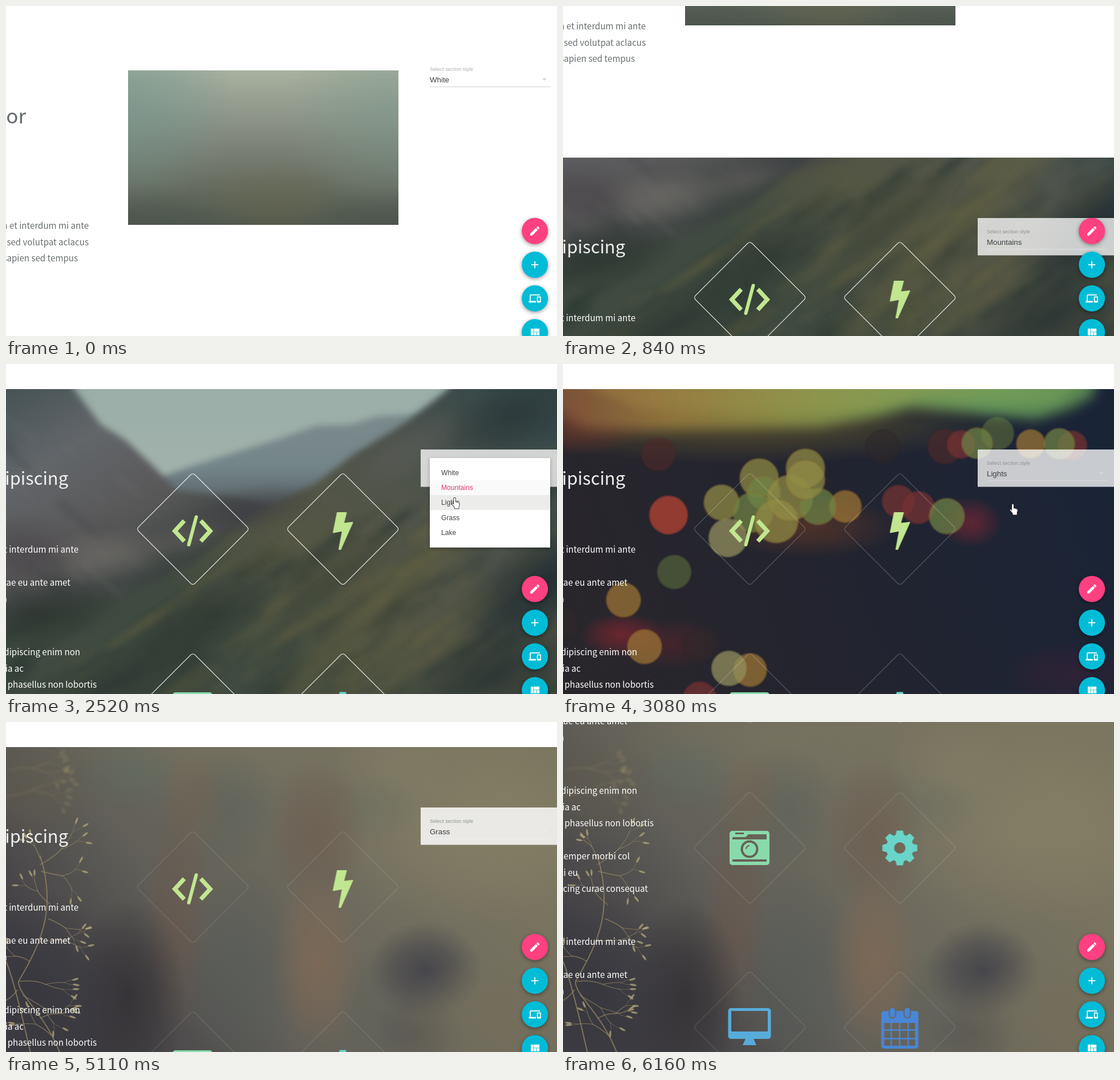
An HTML page with a canvas for the animation above (6230 ms loop, 966x579 px).

```html
<!DOCTYPE html>
<html lang="en">
<head>
<meta charset="utf-8">
<title>Section styles</title>
<style>
html, body { margin: 0; width: 100%; height: 100%; overflow: hidden; background: #fff; }
canvas { display: block; }
</style>
</head>
<body>
<canvas id="stage" width="966" height="579"></canvas>
<script>
const W = 966, H = 579, LOOP = 6230, STEP = 70;
const ctx = document.getElementById('stage').getContext('2d');
const HUMANIST = '"Noto Sans CJK JP", "Noto Sans CJK SC", "Noto Sans CJK", "Open Sans", sans-serif';
const UI = '"Liberation Sans", Arial, sans-serif';

const clamp = v => Math.max(0, Math.min(1, v));
const ramp = (t, a, b) => clamp((t - a) / (b - a));
const smooth = p => p * p * (3 - 2 * p);
const easeOut = p => 1 - (1 - p) ** 3;
const lerp = (a, b, p) => a + (b - a) * p;

function random(seed) {
  return () => {
    seed = (seed * 1664525 + 1013904223) >>> 0;
    return seed / 4294967296;
  };
}

function layer(w, h, draw) {
  const c = document.createElement('canvas');
  c.width = w;
  c.height = h;
  draw(c.getContext('2d'));
  return c;
}

function poly(g, pts, fill) {
  g.beginPath();
  for (let i = 0; i < pts.length; i += 2) g.lineTo(pts[i], pts[i + 1]);
  g.closePath();
  g.fillStyle = fill;
  g.fill();
}

function grad(g, x0, y0, x1, y1, ...cols) {
  const f = g.createLinearGradient(x0, y0, x1, y1);
  cols.forEach((c, i) => f.addColorStop(i / (cols.length - 1), c));
  return f;
}

function blob(g, x, y, rx, ry, rgb, a = 1, turn = 0) {
  g.save();
  g.translate(x, y);
  g.rotate(turn);
  g.scale(rx, ry);
  const f = g.createRadialGradient(0, 0, 0, 0, 0, 1);
  f.addColorStop(0, `rgba(${rgb},${a})`);
  f.addColorStop(.5, `rgba(${rgb},${a * .6})`);
  f.addColorStop(1, `rgba(${rgb},0)`);
  g.fillStyle = f;
  g.fillRect(-1, -1, 2, 2);
  g.restore();
}

function circle(g, x, y, r, fill) {
  g.beginPath();
  g.arc(x, y, r, 0, 7);
  g.fillStyle = fill;
  g.fill();
}

// ---- backdrops, fixed to the viewport ----
const mountains = layer(W, H, g => {
  const rnd = random(11);
  // short blurred strokes along a slope, light or dark
  function streaks(count, slope, inside, light, dark) {
    for (let i = 0; i < count; i++) {
      const x = rnd() * 1060 - 40, y = 60 + rnd() * 560, len = 20 + rnd() * 60;
      const tone = Math.sin((y - x * slope) / 30) + (rnd() - .5) * 1.6;
      if (!inside(x, y)) continue;
      g.strokeStyle = tone > 0 ? light : dark;
      g.lineWidth = 5 + rnd() * 11;
      g.beginPath();
      g.moveTo(x - len / 2, y - len * slope / 2);
      g.lineTo(x + len / 2, y + len * slope / 2);
      g.stroke();
    }
  }
  g.lineCap = 'round';
  g.fillStyle = grad(g, 0, 0, 0, 220, '#98aca6', '#a3b3ac');
  g.fillRect(0, 0, W, H);
  g.filter = 'blur(6px)';
  poly(g, [250, 215, 285, 193, 340, 174, 400, 156, 470, 134, 545, 108, 605, 106, 650, 92, 715, 88, 800, 30, 980, 30, 980, 600, 250, 600],
    grad(g, 0, 90, 0, 270, '#7a898b', '#74858a', '#505659'));
  poly(g, [-20, -20, 95, -20, 121, 46, 165, 105, 209, 133, 261, 182, 300, 222, 400, 234, 480, 252, 420, 600, -20, 600],
    grad(g, 0, 40, 220, 420, '#455254', '#62666a', '#595859', '#3b443f'));
  streaks(150, .85, (x, y) => x < 330 && y > x * .7 + 50 && y < 400, 'rgba(118,116,116,.16)', 'rgba(52,56,62,.18)');
  poly(g, [830, -20, 772, 48, 735, 78, 690, 110, 610, 158, 540, 212, 470, 243, 400, 290, 330, 350, 200, 410, -20, 470, -20, 600, 980, 600, 980, -20],
    grad(g, 880, 60, 480, 560, '#37484a', '#4f544b', '#545644', '#3f4a40'));
  blob(g, 175, 335, 120, 48, '122,117,112', .6, -.1);
  blob(g, 325, 300, 90, 30, '104,98,97', .5, -.3);
  blob(g, 20, 330, 110, 70, '72,66,70', .6);
  blob(g, 50, 440, 160, 60, '40,50,45', .8, -.2);
  blob(g, 420, 258, 130, 42, '62,62,68', .7, -.2);
  blob(g, 710, 150, 120, 45, '92,94,90', .6, -.6);
  blob(g, 890, 90, 130, 65, '43,55,56', .8, -.4);
  streaks(560, -.7, (x, y) => y > 500 - x * .36, 'rgba(104,100,64,.22)', 'rgba(43,55,51,.24)');
  blob(g, 690, 385, 230, 42, '102,98,64', .5, -.62);
  blob(g, 560, 520, 150, 38, '104,100,66', .5, -.6);
  blob(g, 850, 240, 200, 38, '103,101,71', .6, -.6);
  blob(g, 580, 375, 150, 32, '48,58,50', .5, -.65);
  blob(g, 340, 440, 150, 50, '42,53,48', .6, -.5);
  blob(g, 945, 380, 190, 85, '32,44,50', .9, -.6);
  blob(g, 860, 545, 200, 90, '34,46,49', .75, -.4);
  blob(g, 200, 560, 220, 70, '42,53,48', .6, -.3);
});

const lights = layer(W, H, g => {
  g.fillStyle = grad(g, 0, 579, 966, 200, '#2a262b', '#22242f', '#1a2437');
  g.fillRect(0, 0, W, H);
  blob(g, 20, 90, 150, 70, '130,45,45', .7);
  blob(g, 105, 475, 75, 40, '125,38,48', .8);
  blob(g, 190, 490, 90, 45, '80,36,44', .7);
  blob(g, 715, 278, 55, 45, '110,38,52', .8);
  blob(g, 430, 285, 160, 55, '95,55,40', .7);
  blob(g, 890, 545, 120, 60, '58,32,56', .6);
  blob(g, 320, 100, 460, 75, '110,95,45', .6);

  const tones = {
    r: '188,68,52', d: '118,50,52', m: '74,42,44', k: '48,40,41',
    y: '146,140,70', o: '158,118,54', p: '150,148,96', g: '112,132,70', e: '84,98,60'
  };
  const bokeh = [
    [167, 158, 29, 'm'], [185, 265, 33, 'r'], [195, 365, 29, 'e'], [106, 414, 30, 'o'],
    [143, 496, 30, 'o'], [240, 495, 29, 'k'], [0, 455, 27, 'k'], [240, 587, 29, 'd'],
    [328, 537, 29, 'o'], [291, 534, 30, 'p'], [495, 250, 28, 'o'], [344, 200, 34, 'y'],
    [278, 243, 31, 'y'], [352, 226, 29, 'g'], [333, 260, 35, 'g'], [374, 276, 38, 'y'],
    [398, 235, 40, 'y'], [447, 250, 32, 'g'], [289, 305, 33, 'p'], [425, 183, 34, 'y'],
    [425, 203, 34, 'y'], [588, 241, 28, 'd'], [623, 252, 28, 'd'], [673, 267, 31, 'g'],
    [670, 145, 30, 'm'], [698, 141, 24, 'd'], [762, 122, 28, 'e'], [726, 139, 27, 'g'],
    [820, 140, 25, 'o'], [893, 143, 25, 'd'], [870, 140, 27, 'g'], [560, 145, 29, 'k']
  ];
  g.filter = 'blur(1px)';
  for (const [x, y, r, key] of bokeh) {
    const rim = 'yog'.includes(key);
    circle(g, x, y, r, `rgba(${tones[key]},${key === 'k' ? .5 : .72})`);
    g.strokeStyle = rim ? 'rgba(160,110,45,.3)' : `rgba(${tones[key]},.5)`;
    g.lineWidth = 2;
    g.stroke();
  }
  g.filter = 'blur(11px)';
  poly(g, [-30, -30, -30, 75, 40, 112, 150, 116, 300, 112, 450, 110, 550, 92, 610, 76, 700, 84, 830, 96, 890, 78, 930, 56, 940, -30],
    grad(g, 0, 0, 940, 0, '#7c5138', '#8f743c', '#888a45', '#7b9550', '#66985a', '#588350'));
  g.filter = 'blur(8px)';
  poly(g, [20, 30, 130, 78, 350, 84, 520, 78, 640, 55, 860, 70, 910, 30],
    grad(g, 0, 0, 920, 0, 'rgba(160,118,64,.5)', 'rgba(150,156,80,.5)', 'rgba(115,160,92,.5)'));
});

const grass = layer(W, H, g => {
  const rnd = random(29);
  g.fillStyle = grad(g, 150, 579, 800, 40, '#3e3c42', '#615f58', '#716d5f', '#7b765f');
  g.fillRect(0, 0, W, H);
  blob(g, 380, 30, 320, 110, '122,117,96', .6);
  blob(g, 820, 190, 260, 170, '138,132,104', .6);
  blob(g, 680, 70, 110, 80, '134,130,104', .4);
  blob(g, 640, 150, 90, 60, '104,108,96', .4);
  blob(g, 220, 90, 90, 70, '94,106,96', .6);
  blob(g, 390, 150, 90, 110, '90,98,92', .5);
  blob(g, 410, 440, 110, 190, '84,91,88', .6);
  blob(g, 330, 140, 60, 100, '118,98,78', .4);
  blob(g, 300, 340, 60, 210, '108,86,74', .5);
  blob(g, 545, 200, 90, 140, '108,90,76', .6);
  blob(g, 545, 420, 80, 160, '132,106,84', .7);
  blob(g, 650, 510, 70, 120, '92,96,88', .5);
  blob(g, 735, 435, 100, 85, '60,60,70', .8);
  blob(g, 720, 545, 80, 70, '78,76,76', .5);
  blob(g, 890, 530, 200, 130, '116,109,88', .6);
  blob(g, 215, 480, 100, 170, '48,44,49', .75);
  blob(g, 60, 470, 170, 170, '54,54,62', .7);
  blob(g, 40, 110, 130, 110, '98,92,78', .5);

  function sprig(x, y, dir, len, depth) {
    const bend = (rnd() - .5) * .5;
    const ex = x + Math.cos(dir + bend) * len, ey = y + Math.sin(dir + bend) * len;
    g.lineWidth = .7 + depth * .35;
    g.beginPath();
    g.moveTo(x, y);
    g.quadraticCurveTo(x + Math.cos(dir) * len * .6, y + Math.sin(dir) * len * .6, ex, ey);
    g.stroke();
    if (depth === 0) {
      g.beginPath();
      g.ellipse(ex, ey, 6, 1.8, dir + bend, 0, 7);
      g.fill();
      return;
    }
    for (const side of [-.4, .4]) sprig(ex, ey, dir + bend + side + (rnd() - .5) * .4, len * (.6 + rnd() * .2), depth - 1);
  }
  g.lineCap = 'round';
  g.strokeStyle = 'rgba(164,148,104,.4)';
  g.fillStyle = 'rgba(176,162,114,.4)';
  g.filter = 'blur(2.5px)';
  sprig(0, 130, -.1, 48, 3);
  sprig(5, 85, -.3, 42, 3);
  g.filter = 'blur(.5px)';
  g.strokeStyle = 'rgba(156,138,100,.7)';
  g.fillStyle = 'rgba(176,164,122,.75)';
  g.lineWidth = 2;
  g.beginPath();
  g.moveTo(98, 590);
  g.bezierCurveTo(70, 510, 20, 480, 22, 455);
  g.bezierCurveTo(60, 390, 90, 330, 60, 235);
  g.moveTo(0, 420);
  g.quadraticCurveTo(15, 455, 45, 590);
  g.stroke();
  const stems = [
    [60, 250, -.5, 46], [60, 240, -1.9, 24], [62, 262, .25, 38], [78, 320, -2.5, 32],
    [74, 345, .4, 34], [60, 385, -.1, 42], [42, 420, -2.6, 28], [24, 455, -.1, 46],
    [30, 480, .5, 42], [60, 520, -.5, 32], [20, 470, 2.2, 28], [80, 550, -2.4, 34]
  ];
  for (const [x, y, dir, len] of stems) sprig(x, y, dir, len, 2);
});

// ---- feature icons, 80 by 80, centred on 40,40 ----
const cut = g => { g.globalCompositeOperation = 'destination-out'; };
const add = g => { g.globalCompositeOperation = 'source-over'; };
const box = (g, x, y, w, h, r = 0) => {
  g.beginPath();
  g.roundRect(x, y, w, h, r);
  g.fill();
};
const icon = (color, draw) => layer(80, 80, g => {
  g.fillStyle = g.strokeStyle = color;
  draw(g);
});

const icons = [
  icon('#c1e690', g => {
    g.lineWidth = 7.5;
    for (const s of [-1, 1]) {
      g.beginPath();
      g.moveTo(40 + s * 14.5, 25);
      g.lineTo(40 + s * 31, 43);
      g.lineTo(40 + s * 14.5, 61);
      g.stroke();
    }
    g.lineWidth = 6;
    g.lineCap = 'round';
    g.beginPath();
    g.moveTo(46.5, 18.5);
    g.lineTo(33.5, 67);
    g.stroke();
  }),
  icon('#c1e690', g => {
    const pts = [30.5, 11, 46, 11, 41, 30, 57, 28, 36, 75, 33.5, 75, 39.5, 42.5, 23.5, 45.5];
    poly(g, pts, '#c1e690');
    g.lineWidth = 2;
    g.lineJoin = 'round';
    g.stroke();
  }),
  icon('#89daab', g => {
    box(g, 5, 10, 70, 60, 5);
    cut(g);
    box(g, 15, 13, 15, 3);
    poly(g, [10, 25, 10, 21, 33, 21, 38, 16, 70, 16, 70, 25], '#000');
    box(g, 10, 60, 60, 4);
    circle(g, 40, 42, 15.5, '#000');
    add(g);
    circle(g, 40, 42, 11.5, '#89daab');
    cut(g);
    g.lineWidth = 2;
    g.beginPath();
    g.arc(40, 42, 6, Math.PI, Math.PI * 1.5);
    g.stroke();
  }),
  icon('#69d5c9', g => {
    circle(g, 40, 40, 24, '#69d5c9');
    for (let i = 0; i < 8; i++) {
      g.save();
      g.translate(40, 40);
      g.rotate(i * Math.PI / 4);
      poly(g, [-8, -20, -5.5, -30.5, 5.5, -30.5, 8, -20], '#69d5c9');
      g.restore();
    }
    cut(g);
    circle(g, 40, 40, 10, '#000');
  }),
  icon('#57acda', g => {
    box(g, 2.5, 6, 75, 54, 5);
    poly(g, [33, 60, 47, 60, 52, 71, 28, 71], '#57acda');
    cut(g);
    box(g, 8, 11, 64, 36, 1);
  }),
  icon('#4986d7', g => {
    box(g, 7.5, 11, 65, 66, 5);
    cut(g);
    [12.5, 26, 41, 55.8].forEach((x, c) => [32, 45.8, 60.8].forEach((y, r) =>
      box(g, x, y, c % 3 ? 12.5 : 11.2, r === 1 ? 12.5 : 11.2)));
    for (const x of [20.5, 46.5]) box(g, x, 4, 13, 20, 6);
    add(g);
    for (const x of [22.5, 48.5]) box(g, x, 6, 9, 16, 4);
  })
];

// ---- page ----
const FIRST_TOP = -19, SECOND_TOP = 616;
const rows = [862, 1178, 1493], cols = [328, 591];
const themes = { Mountains: mountains, Lights: lights, Grass: grass };
const edges = { Mountains: 1, Lights: .27, Grass: .16 };

function text(str, x, y, font, color, align = 'left') {
  ctx.font = font;
  ctx.fillStyle = color;
  ctx.textAlign = align;
  ctx.fillText(str, x, y);
}

const body = (str, right, y, color) => text(str, right, y, `300 15.1px ${HUMANIST}`, color, 'right');

function picker(top, value, alpha) {
  const plain = value === 'White';
  ctx.fillStyle = `rgba(255,255,255,${alpha})`;
  ctx.fillRect(727, top, W - 727, 65.5);
  text('Select section style', 743, top + 27, `8.9px ${UI}`, plain ? '#b0b0b0' : '#8d9690');
  text(value, 743, top + 46.5, `13.3px ${UI}`, '#3a4040');
  const faint = plain ? '#d5d5d5' : 'rgba(255,255,255,.25)';
  ctx.fillStyle = plain ? '#dedede' : faint;
  ctx.fillRect(743, top + 54, 211, 1.5);
  poly(ctx, [940, top + 40, 948, top + 40, 944, top + 44], faint);
}

function firstSection() {
  ctx.fillStyle = '#fff';
  ctx.fillRect(0, FIRST_TOP, W, SECOND_TOP - FIRST_TOP);
  text('Dolor', 35, 206, `300 35px ${HUMANIST}`, '#666c6e', 'right');
  body('lorem et interdum mi ante', 145, 391, '#686e6e');
  body('sed volutpat aclacus', 145, 420, '#686e6e');
  body('sapien sed tempus', 126, 448, '#686e6e');
  ctx.save();
  ctx.beginPath();
  ctx.rect(214, 113, 474, 271);
  ctx.clip();
  ctx.fillStyle = grad(ctx, 0, 113, 0, 384, '#a9b1a0', '#929a8d', '#7c8176', '#666c5f', '#4f574d');
  ctx.fillRect(214, 113, 474, 271);
  blob(ctx, 204, 165, 200, 200, '112,150,140', .6);
  blob(ctx, 688, 190, 200, 180, '122,152,138', .5);
  blob(ctx, 470, 345, 120, 70, '106,104,76', .4);
  blob(ctx, 214, 384, 170, 70, '72,84,76', .5);
  blob(ctx, 688, 384, 170, 70, '74,84,76', .5);
  ctx.restore();
  picker(FIRST_TOP + 106, 'White', 1);
}

function diamond(x, y, alpha) {
  ctx.save();
  ctx.translate(x - .4, y - .4);
  ctx.rotate(Math.PI / 4);
  ctx.strokeStyle = `rgba(255,255,255,${alpha})`;
  ctx.lineWidth = 1;
  ctx.beginPath();
  ctx.roundRect(-70, -70, 140, 140, 5);
  ctx.stroke();
  ctx.restore();
}

function secondSection(scroll, from, to, mix, value, alpha) {
  ctx.save();
  ctx.beginPath();
  ctx.rect(0, SECOND_TOP, W, 1400);
  ctx.clip();
  ctx.translate(0, scroll);
  ctx.drawImage(themes[from], 0, 0);
  ctx.globalAlpha = mix;
  if (mix) ctx.drawImage(themes[to], 0, 0);
  ctx.restore();

  const edge = lerp(edges[from], edges[to], mix);
  rows.forEach((y, r) => cols.forEach((x, c) => {
    diamond(x, y, edge);
    ctx.drawImage(icons[r * 2 + c], x - 41 + c * .5, y - 40);
  }));

  text('Adipiscing', 109, 784, `300 30.8px ${HUMANIST}`, '#f0f0f0', 'right');
  for (const y of [903, 1348]) {
    body('et interdum mi ante', 127, y, '#fff');
    body('vitae eu ante amet', 113, y + 58, '#fff');
    body('non', 2, y + 87, '#fff');
  }
  body('adipiscing enim non', 130, 1083, '#fff');
  body('lacinia ac', 31, 1112, '#fff');
  body('faucibus phasellus non lobortis', 159, 1140, '#fff');
  body('semper morbi col', 117, 1198, '#fff');
  body('orci eu', 26, 1227, '#fff');
  body('adipiscing curae consequat', 149, 1255, '#fff');
  picker(SECOND_TOP + 106, value, alpha);
}

function menu(open, alpha, selected, hover) {
  if (alpha <= 0) return;
  const s = .45 + .55 * open, row = 26.35 * s, top = 165 + 12.3 * s;
  ctx.save();
  ctx.globalAlpha = alpha;
  ctx.shadowColor = 'rgba(0,0,0,.3)';
  ctx.shadowBlur = 6;
  ctx.shadowOffsetY = 2;
  ctx.fillStyle = '#fff';
  ctx.fillRect(743, 165, 211, 157 * s);
  ctx.shadowColor = 'transparent';
  ['White', 'Mountains', 'Lights', 'Grass', 'Lake'].forEach((name, i) => {
    const on = name === selected;
    if (name === hover || on) {
      ctx.fillStyle = name === hover ? '#ececea' : '#fafafa';
      ctx.fillRect(743, top + i * row, 211, row);
    }
    text(name, 763, top + (i + .5) * row + 4.3, `12.1px ${UI}`, on ? '#e8386f' : '#40454a');
  });
  ctx.restore();
}

const fabs = [
  'M3 17.25V21h3.75L17.81 9.94l-3.75-3.75L3 17.25zM20.71 7.04c.39-.39.39-1.02 0-1.41l-2.34-2.34c-.39-.39-1.02-.39-1.41 0l-1.83 1.83 3.75 3.75 1.83-1.83z',
  'M19 13h-6v6h-2v-6H5v-2h6V5h2v6h6v2z',
  'M4 6h18V4H4c-1.1 0-2 .9-2 2v11H0v3h14v-3H4V6zm19 2h-6c-.55 0-1 .45-1 1v10c0 .55.45 1 1 1h6c.55 0 1-.45 1-1V9c0-.55-.45-1-1-1zm-1 9h-4v-7h4v7z',
  'M10 18h5v-6h-5v6zm-6 0h5V5H4v13zm12 0h5v-6h-5v6zM10 5v6h11V5H10z'
].map(d => new Path2D(d));

function buttons() {
  fabs.forEach((shape, i) => {
    const y = 394.7 + i * 59.2;
    ctx.save();
    ctx.shadowColor = 'rgba(0,0,0,.4)';
    ctx.shadowBlur = 7;
    ctx.shadowOffsetY = 2;
    circle(ctx, 927.2, y, 23, i ? '#00bcd7' : '#ff4081');
    ctx.shadowColor = 'transparent';
    ctx.translate(927.2, y);
    ctx.scale(.89, .89);
    ctx.translate(-12, -12);
    ctx.fillStyle = '#fff';
    ctx.fill(shape);
    ctx.restore();
  });
}

const pointers = {
  resize: ['M0 4 4 0V3H14V0L18 4 14 8V5H4V8z', '#000', '#fff'],
  arrow: ['M0 0v15l3.5-3.3 2.3 5.3 2.3-1-2.3-5.2H10.5z', '#fff', '#000'],
  hand: ['M4 13V2.2a1.5 1.5 0 0 1 3 0V8l5 1.2q2 .5 2 2.6l-1.3 4.4V19.5H5.5V17L1.2 12q-.8-1.8.8-2.2Z', '#fff', '#111']
};
const track = [
  [1190, 972, 142, 'resize'], [1260, 960, 142, 'resize'], [1330, 950, 150, 'arrow'],
  [1680, 774, 198, 'hand'], [2170, 774, 198, 'hand'], [2440, 781, 234, 'hand'],
  [2660, 781, 234, 'hand'], [2940, 783, 245, 'hand'], [3290, 783, 245, 'arrow'],
  [3430, 783, 245, 'arrow'], [3640, 774, 198, 'hand'], [3850, 774, 198, 'hand'],
  [3980, 770, 234, 'hand'], [4130, 770, 234, 'hand'], [4390, 775, 261, 'hand'],
  [4480, 775, 261, 'hand'], [4750, 954, 172, 'arrow'], [4850, 954, 172, 'arrow'], [5110, 970, 174, 'arrow']
];

function pointer(t) {
  const i = track.findIndex((k, n) => t >= k[0] && n + 1 < track.length && t < track[n + 1][0]);
  if (i < 0) return;
  const [t0, x0, y0, kind] = track[i], [t1, x1, y1] = track[i + 1];
  const p = smooth(ramp(t, t0, t1));
  const [d, fill, line] = pointers[kind], shape = new Path2D(d);
  ctx.save();
  ctx.translate(Math.round(lerp(x0, x1, p)), Math.round(lerp(y0, y1, p)));
  ctx.lineWidth = kind === 'resize' ? 3 : 1.5;
  ctx.lineJoin = 'round';
  ctx.strokeStyle = line;
  ctx.stroke(shape);
  ctx.fillStyle = fill;
  ctx.fill(shape);
  ctx.restore();
}

function draw(t) {
  const scroll = Math.round(572 * smooth(ramp(t, 420, 1150)) + 385 * smooth(ramp(t, 5250, 6160)));
  const late = t >= 4400;
  const mix = late ? ramp(t, 4430, 4760) : ramp(t, 2680, 3010);
  const value = t < 2700 ? 'Mountains' : t < 4480 ? 'Lights' : 'Grass';
  const bright = t >= 4480 || (t >= 1190 && t < 2450);

  ctx.fillStyle = '#fff';
  ctx.fillRect(0, 0, W, H);
  ctx.save();
  ctx.translate(0, -scroll);
  firstSection();
  secondSection(scroll, late ? 'Lights' : 'Mountains', late ? 'Grass' : 'Lights', mix, value, bright ? .83 : .76);
  ctx.restore();

  const second = t >= 3500, begin = second ? 3800 : 1770;
  const open = easeOut(ramp(t, begin, begin + 350));
  const fade = second ? ramp(t, 4470, 4700) : ramp(t, 2700, 2980);
  const hover = second ? (t > 4250 ? 'Grass' : '') : (t > 2380 ? 'Lights' : '');
  menu(open, open * (1 - fade), second ? 'Lights' : 'Mountains', hover);
  buttons();
  pointer(t);
}

const start = performance.now();
function tick() {
  const t = (performance.now() - start) % LOOP;
  draw(Math.floor(t / STEP) * STEP);
  requestAnimationFrame(tick);
}
draw(0);
tick();
</script>
</body>
</html>
```
